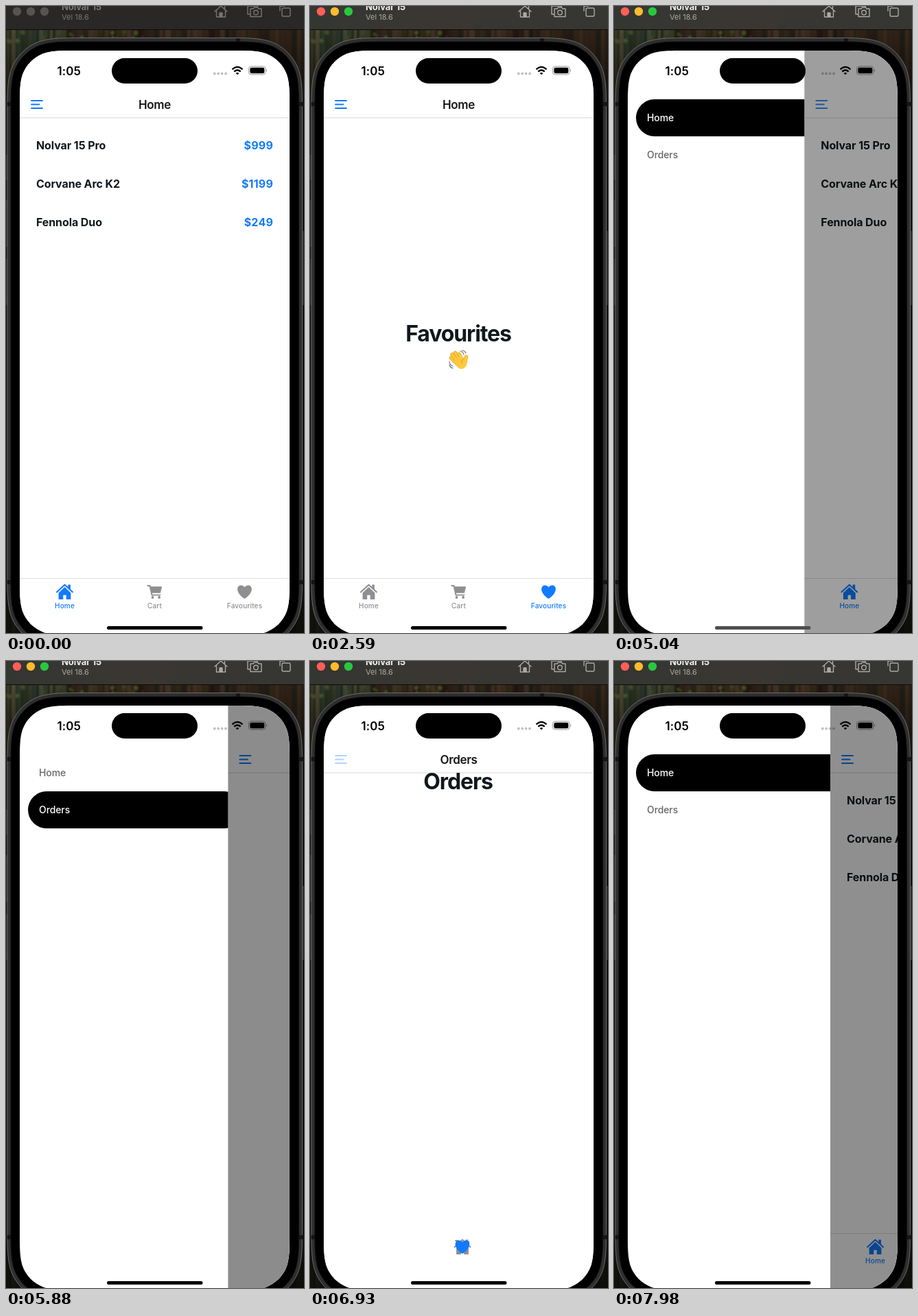
These frames come from a looping animation (434x914 px, 8000 ms). An HTML page:

```html
<!DOCTYPE html>
<html lang="en">
<head>
<meta charset="utf-8">
<title>Drawer and tabs demo</title>
<style>
html, body { margin: 0; width: 434px; height: 914px; overflow: hidden; background: #000; }
svg { display: block; }
text { font-family: Inter, "Open Sans", sans-serif; }
.bar { font-size: 17px; font-weight: 600; letter-spacing: -.35px; fill: #151515; }
.clock { font-size: 17px; font-weight: 600; letter-spacing: .1px; }
.row { font-size: 16px; font-weight: 700; letter-spacing: -.1px; fill: #11181c; }
.price { fill: #147bf5; text-anchor: end; letter-spacing: .2px; }
.big { font-size: 32px; font-weight: 700; letter-spacing: -1.1px; fill: #11181c; }
.mid { text-anchor: middle; }
.tab { font-size: 10px; font-weight: 500; letter-spacing: .15px; text-anchor: middle; }
.item { font-size: 14px; font-weight: 500; letter-spacing: -.1px; }
.tool { fill: none; stroke-width: 1.4; stroke-linejoin: round; stroke-linecap: round; }
</style>
</head>
<body>
<svg width="434" height="914" viewBox="0 0 434 914">
  <defs>
    <clipPath id="screen"><path id="glass"/></clipPath>
    <filter id="soft" x="0" y="0" width="1" height="1"><feGaussianBlur stdDeviation="1.2"/></filter>
    <linearGradient id="dusk" x2="0" y2="1">
      <stop offset="0" stop-color="#000" stop-opacity="0"/>
      <stop offset=".12" stop-color="#060806" stop-opacity=".65"/>
      <stop offset="1" stop-color="#060806" stop-opacity=".8"/>
    </linearGradient>
    <linearGradient id="active">
      <stop offset="0" stop-color="#343632"/>
      <stop offset=".54" stop-color="#3b3732"/>
      <stop offset=".55" stop-color="#373632"/>
      <stop offset="1" stop-color="#363632"/>
    </linearGradient>
    <g id="house">
      <path d="M-11.400 .3L0 -10.300L11.400 .3" fill="none" stroke="currentColor" stroke-width="2.100" stroke-linecap="round" stroke-linejoin="round"/>
      <path d="M4.800 -10.500H8.400V-2.500L4.800 -6ZM-8.900 1.600L0 -6.900L8.900 1.600V11H2.200V4.800H-2.200V11H-8.900Z" fill="currentColor"/>
    </g>
    <g id="cart" fill="currentColor">
      <path d="M-10 -9H-7L-4 4.6H8" fill="none" stroke="currentColor" stroke-width="1.9" stroke-linecap="round" stroke-linejoin="round"/>
      <path d="M-6.4 -7.8H10.6L8.4 1.8H-4.4Z"/>
      <circle cx="-3" cy="8" r="1.9"/><circle cx="6.6" cy="8" r="1.9"/>
    </g>
    <path id="heart" fill="currentColor" d="M0 10C-14 1 -11.5 -9.6 -5.5 -9.6C-2.6 -9.6 -.8 -8.2 0 -6.6C.8 -8.2 2.6 -9.6 5.5 -9.6C11.5 -9.6 14 1 0 10Z"/>
    <g id="wave" fill="none" stroke-linecap="round">
      <g id="fingers"></g>
      <path d="M212 517L219 511L226 517Q229 523 223 527Q219 529 215 524Z" fill="#ffc83d" stroke="#ffc83d" stroke-width="3" stroke-linejoin="round"/>
      <path d="M221 520Q220 516 224 514" stroke="#d9901c" stroke-width=".9"/>
      <path d="M219 503Q223 504 224 508M222 502Q226 503 227 506M203 518Q203 523 208 525M203 523Q204 527 208 528" stroke="#6d6d70" stroke-width="1.1"/>
    </g>
  </defs>

  <g id="wall" filter="url(#soft)"></g>
  <rect y="35" width="434" height="879" fill="url(#dusk)"/>

  <rect id="title" width="434" height="34"/>
  <rect y="34" width="434" height="1" fill="#0b0b0a"/>
  <g id="lights"></g>
  <text id="device" x="81" y="6" font-size="13" font-weight="700" letter-spacing="-.1">Nolvar 15</text>
  <text id="system" x="81" y="20" font-size="11">Vel 18.6</text>
  <g id="tools" class="tool">
    <path d="M304 8L313 0L322 8M306.500 7V16H319.500V7M318.500 4V0"/>
    <path d="M311 16V10H315V16" fill="currentColor"/>
    <path d="M355 12H352V0H366V2M358 4H360L361.500 2H366.500L368 4H372V15.500H356V4Z"/>
    <circle cx="364" cy="9.500" r="3.300"/>
    <rect x="402" y="3" width="12" height="12" rx="2"/><path d="M399 7V0H406"/>
  </g>

  <g fill="#242424" stroke="#4b4b4b" stroke-width=".7">
    <rect x="-1" y="218" width="3" height="34"/><rect x="-1" y="284" width="3" height="66"/>
    <rect x="-1" y="370" width="3" height="65"/><rect x="432" y="329" width="3" height="106"/>
  </g>
  <path id="shell" fill="#2e2e2e" stroke="#6b6b6b"/>
  <path d="M335 47H341V53H335ZM2 140H8V146H2ZM426 140H432V146H426ZM2 837H8V843H2ZM426 837H432V843H426Z" fill="#161616"/>
  <path id="bezel" stroke="#111"/>

  <g clip-path="url(#screen)">
    <rect x="20" y="65" width="393" height="852" fill="#fff"/>
    <g id="drawer">
      <rect id="pill" x="32" width="313" height="54" rx="27"/>
      <text id="toHome" class="item" x="48" y="168">Home</text>
      <text id="toOrders" class="item" x="48" y="222">Orders</text>
    </g>
    <g id="content">
      <rect x="20" y="65" width="393" height="852" fill="#fff"/>
      <g id="menu" stroke="#127aff" stroke-width="1.900" stroke-linecap="round">
        <path d="M37 138H53M37 143.500H48.500M37 149H53"/>
      </g>
      <text id="heading" class="bar mid" x="216.500" y="149.500"></text>
      <rect x="20" y="162.500" width="393" height="1" fill="#d6d6d6"/>
      <g id="list"></g>
      <g id="hello">
        <text id="greeting" class="big mid" x="216" y="489"></text>
        <use href="#wave"/>
      </g>
      <g id="tabs"><rect x="20" y="834" width="393" height="1" fill="#dedede"/></g>
      <g id="orders">
        <text class="big mid" x="215.500" y="187">Orders</text>
        <g color="#8e8e93"><use href="#house" x="222" y="854"/><use href="#cart" x="222" y="854"/></g>
        <use href="#heart" x="222" y="854" color="#127aff"/>
      </g>
      <rect id="shade" x="20" y="65" width="393" height="852"/>
    </g>

    <text x="74.500" y="100.500" class="clock">1:05</text>
    <rect x="154" y="76" width="125" height="37" rx="18.500"/>
    <g fill="#000" fill-opacity=".24">
      <circle cx="303.800" cy="98.500" r="1.900"/><circle cx="309.200" cy="98.500" r="1.900"/>
      <circle cx="314.600" cy="98.500" r="1.900"/><circle cx="320" cy="98.500" r="1.900"/>
    </g>
    <g fill="none" stroke="#000" stroke-width="2.300">
      <path d="M329.500 92.400Q337 85.400 344.500 92.400M332.300 95.600Q337 91.400 341.700 95.600"/>
      <path d="M337 100.300L334.600 97.900Q337 96 339.400 97.900Z" fill="#000" stroke="none"/>
    </g>
    <rect x="353.500" y="88" width="24.500" height="12" rx="3.600" fill="none" stroke="#000" stroke-opacity=".4"/>
    <rect x="355.300" y="89.700" width="21" height="8.600" rx="2.300"/>
    <path d="M379.300 92Q381.300 94 379.300 96Z" fill="#000" fill-opacity=".45"/>
    <rect id="grip" x="147" y="904" width="139.500" height="5" rx="2.500"/>
  </g>
</svg>
<script>
const $ = id => document.getElementById(id);
const BLUE = '#127aff', GREY = '#8e8e93';
const LOOP = 8000, STEP = 70, WIDTH = 337, RATE = .007;

const set = (id, attrs) => {
  for (const k in attrs) $(id).setAttribute(k, attrs[k]);
};
const show = (id, on) => { $(id).style.display = on ? '' : 'none'; };

// Rounded box whose corners ease into the straight sides
function smoothBox(x, y, w, h, r) {
  const far = 1.529, a = 1.088, b = .868, c = .631, d = .075, e = .373, f = .169;
  const corner = [[0, far], [0, a], [0, b], [d, c], [f, e], [e, f], [c, d], [b, 0], [a, 0], [far, 0]];
  const place = (flipX, flipY) => corner.map(([u, v]) =>
    `${flipX ? x + w - u * r : x + u * r} ${flipY ? y + h - v * r : y + v * r}`);
  const parts = [place(0, 0), place(1, 0).reverse(), place(1, 1), place(0, 1).reverse()];
  return 'M' + parts.map(p => `${p[0]}C${p.slice(1).join(' ')}`).join('L') + 'Z';
}
set('glass', { d: smoothBox(20, 65, 393, 852, 55) });
set('bezel', { d: smoothBox(7, 52, 419.5, 878, 68) });
set('shell', { d: smoothBox(2, 46.5, 429.5, 889, 73) });

// Soft forest backdrop around the phone
let seed = 11;
const rnd = () => (seed = seed * 16807 % 2147483647) / 2147483647;
let wall = '<rect width="434" height="914" fill="#2a2015"/>';
for (let i = 0; i < 55; i++) {
  const x = i * 8;
  const tone = x < 85 ? `hsl(${60 + rnd() * 130},18%,${13 + rnd() * 14}%)`
                      : `hsl(${26 + rnd() * 10},32%,${9 + rnd() * 10}%)`;
  wall += `<rect x="${x}" y="30" width="${4 + rnd() * 5}" height="884" fill="${tone}"/>`;
}
for (let i = 0; i < 50; i++) {
  wall += `<circle cx="${rnd() * 200}" cy="${36 + rnd() * 28}" r="${1 + rnd() * 2.5}" fill="hsl(72,30%,${14 + rnd() * 18}%)" opacity=".7"/>`;
}
$('wall').innerHTML = wall;

$('lights').innerHTML = [16, 36, 56].map(x => `<circle cx="${x}" cy="8" r="6.2"/>`).join('');

const fingers = ['M216 523L205.500 513', 'M216 520L207 508', 'M219 517L211.500 505.500', 'M221 515L217 507.500', 'M226 519L227.500 511.500'];
$('fingers').innerHTML = fingers.map(d =>
  `<path d="${d}" stroke="#d9901c" stroke-width="5.4"/><path d="${d}" stroke="#ffc83d" stroke-width="4.4"/>`).join('');

const goods = [['Nolvar 15 Pro', '$999'], ['Corvane Arc K2', '$1199'], ['Fennola Duo', '$249']];
$('list').innerHTML = goods.map(([name, price], i) => {
  const y = 209 + i * 56;
  return `<text class="row" x="44" y="${y}">${name}</text><text class="row price" x="389" y="${y}">${price}</text>`;
}).join('');

const tabs = [['Home', 'house'], ['Cart', 'cart'], ['Favourites', 'heart']];
$('tabs').innerHTML += tabs.map(([label, icon], i) => {
  const x = 85.5 + i * 131;
  return `<g id="tab${i}"><use href="#${icon}" x="${x}" y="854"/><text class="tab" x="${x}" y="877.5" fill="currentColor">${label}</text></g>`;
}).join('');

// Drawer moves: begin, end, spring origin, opening or closing
const moves = [
  [4900, 5670, 4834, true],
  [5880, 6650, 5865, false],
  [7140, 7700, 7075, true],
  [7980, 8000, 7961, false]
];

function drawerAt(t) {
  const move = moves.filter(m => t >= m[0]).pop();
  if (!move) return 0;
  const [, end, origin, opening] = move;
  const rest = t > end ? 0 : Math.exp(-RATE * (t - origin));
  return opening ? 1 - rest : rest;
}

// The menu button dims while pressed, then fades back
function menuAt(t) {
  for (const [down, up] of [[4760, 4900], [6930, 7140]]) {
    if (t >= down && t < up) return .32;
    if (t >= up && t < up + 210) return .32 + .68 * (t - up + 70) / 280;
  }
  return 1;
}

function draw(t) {
  const focused = t >= 1050;
  const onOrders = t >= 5880 && t < 7980;
  const tab = t >= 1400 && t < 2590 ? 1 : t >= 2590 && t < 3710 ? 2 : 0;
  const open = drawerAt(t);
  const ink = focused ? '#aaa9a5' : '#777674';

  set('title', { fill: focused ? 'url(#active)' : '#292827' });
  set('device', { fill: focused ? '#f0f0ee' : ink });
  set('system', { fill: ink });
  set('tools', { stroke: ink, color: ink });
  ['#ff5f57', '#febc2e', '#28c840'].forEach((c, i) =>
    $('lights').children[i].setAttribute('fill', focused ? c : '#555453'));

  $('heading').textContent = onOrders ? 'Orders' : 'Home';
  $('greeting').textContent = tab === 1 ? 'Shopping Cart' : 'Favourites';
  show('list', !onOrders && tab === 0);
  show('hello', !onOrders && tab > 0);
  show('tabs', !onOrders);
  show('orders', onOrders);
  tabs.forEach((_, i) => set('tab' + i, { color: i === tab ? BLUE : GREY }));

  set('menu', { opacity: menuAt(t) });
  set('pill', { y: onOrders ? 190 : 136 });
  set('toHome', { fill: onOrders ? '#666' : '#fff' });
  set('toOrders', { fill: onOrders ? '#fff' : '#666' });
  show('drawer', open > 0);
  set('content', { transform: `translate(${open * WIDTH} 0)` });
  set('shade', { opacity: open / 2 });
  set('grip', { fill: t >= 4970 && t < 5180 ? '#4f4f4f' : '#000' });
}

const start = performance.now();
function tick() {
  const t = (performance.now() - start) % LOOP;
  draw(Math.floor(t / STEP) * STEP);
  requestAnimationFrame(tick);
}
draw(0);
requestAnimationFrame(tick);
</script>
</body>
</html>
```
